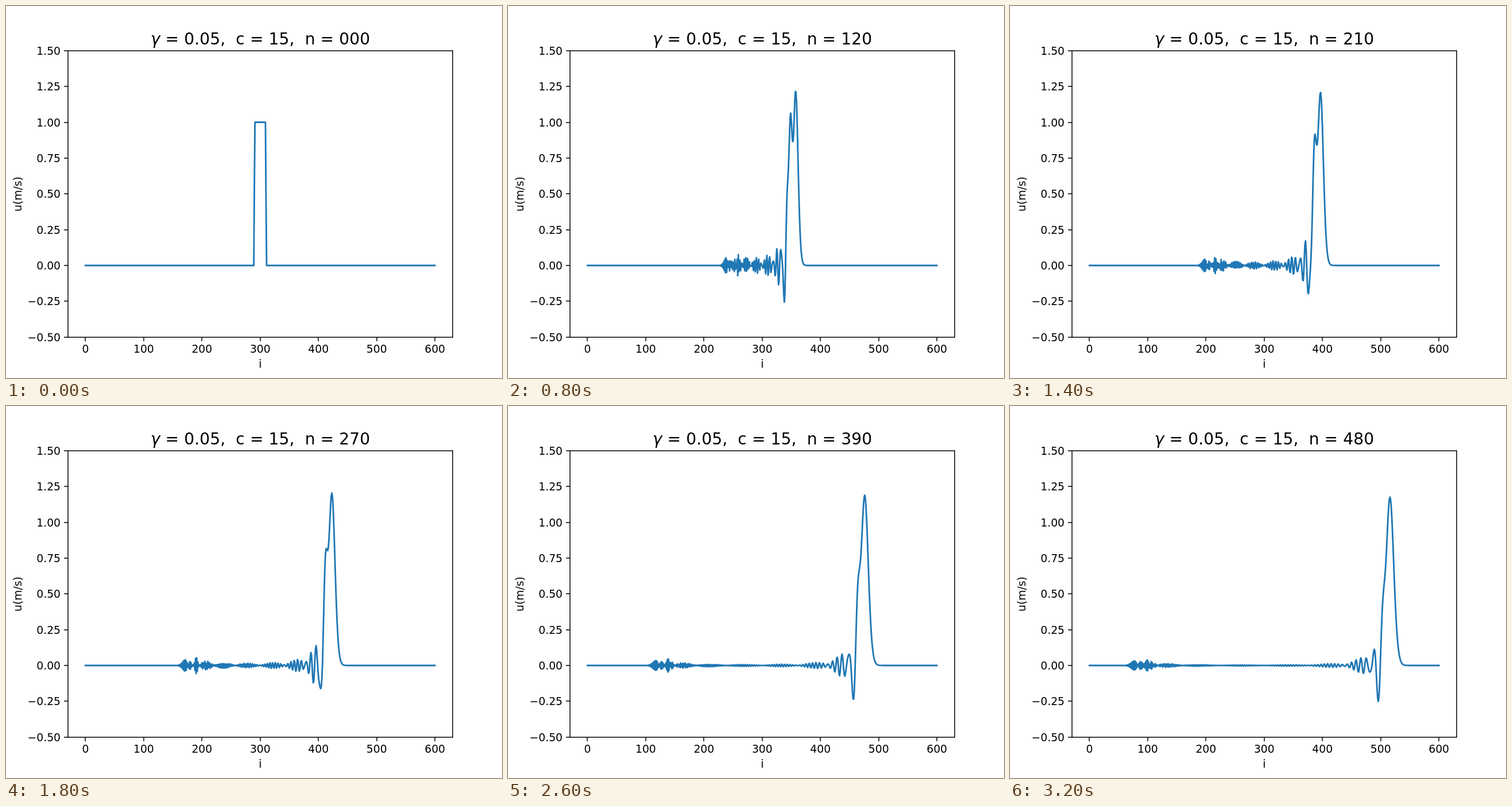
Recreate the animation shown at these times as an HTML page. Size 864x648 px, loop 3.4 s.

```html
<!DOCTYPE html>
<html lang="en">
<head>
<meta charset="utf-8">
<title>Advection of a square pulse</title>
<style>
  html, body { margin: 0; width: 100%; height: 100%; overflow: hidden; background: #fff; }
  svg { display: block; width: 864px; height: 648px; font: 18.75px "DejaVu Sans", sans-serif; }
  text { white-space: pre; }
  #title { font-size: 28.125px; letter-spacing: .1px; }
  #title tspan { font-style: italic; }
  #axes { fill: none; stroke: #000; stroke-width: 1.5; }
  #curve { fill: none; stroke: #1f77b4; stroke-width: 2.8125; stroke-linejoin: round; stroke-linecap: square; }
</style>
</head>
<body>
<svg viewBox="0 0 864 648">
  <path id="curve"/>
  <path id="axes"/>
  <g id="labels"></g>
  <text x="442.8" y="630" text-anchor="middle">i</text>
  <text transform="translate(27 327.5) rotate(-90)" text-anchor="middle">u(m/s)</text>
  <text id="title" x="443" y="67" text-anchor="middle"><tspan>γ</tspan> = 0.05,  c = 15,  n = <tspan id="count" style="font-style:normal">000</tspan></text>
</svg>
<script>
const $ = id => document.getElementById(id);
const SIZE = 601, CFL = 0.45, GAMMA = 0.05;
const FRAMES = 17, STEPS = 30, HOLD = 200;

const px = i => 108 + (i + 30) * 669.6 / 660;
const py = u => 576.72 - (u + 0.5) * 249.48;

function drawAxes() {
  let d = "M108 78H778V577H108Z", labels = "";
  const label = (x, y, anchor, s) =>
    labels += `<text x="${x}" y="${y}" text-anchor="${anchor}">${s}</text>`;
  for (let i = 0; i <= 600; i += 100) {
    d += `M${Math.round(px(i))} 577v7`;
    label(px(i), 604, "middle", i);
  }
  for (let u = -0.5; u <= 1.5; u += 0.25) {
    const y = Math.round(py(u));
    d += `M108 ${y}h-7`;
    label(95, y + 7, "end", u.toFixed(2).replace("-", "−"));
  }
  $("axes").setAttribute("d", d);
  $("labels").innerHTML = labels;
}

// Leapfrog advection with a Robert–Asselin time filter, started by one upwind step.
function solve() {
  let old = Array.from({ length: SIZE }, (_, i) => +(i >= 290 && i < 310));
  let now = old.map((u, i) => u - CFL * (u - (old[i - 1] || 0)));
  const paths = [];
  for (let n = 0; n <= (FRAMES - 1) * STEPS; n++) {
    if (n % STEPS === 0)
      paths.push("M" + now.map((u, i) => px(i).toFixed(2) + " " + py(u).toFixed(2)).join("L"));
    const next = old.map((u, i) => u - CFL * ((now[i + 1] || 0) - (now[i - 1] || 0)));
    old = now.map((u, i) => u + GAMMA * (old[i] - 2 * u + next[i]));
    now = next;
  }
  return paths;
}

drawAxes();
const paths = solve();
const start = performance.now();
let shown = -1;

function draw(time) {
  const frame = Math.floor(Math.max(0, time - start) / HOLD) % FRAMES;
  if (frame !== shown) {
    shown = frame;
    $("curve").setAttribute("d", paths[frame]);
    $("count").textContent = String(frame * STEPS).padStart(3, "0");
  }
  requestAnimationFrame(draw);
}
draw(start);
</script>
</body>
</html>
```
